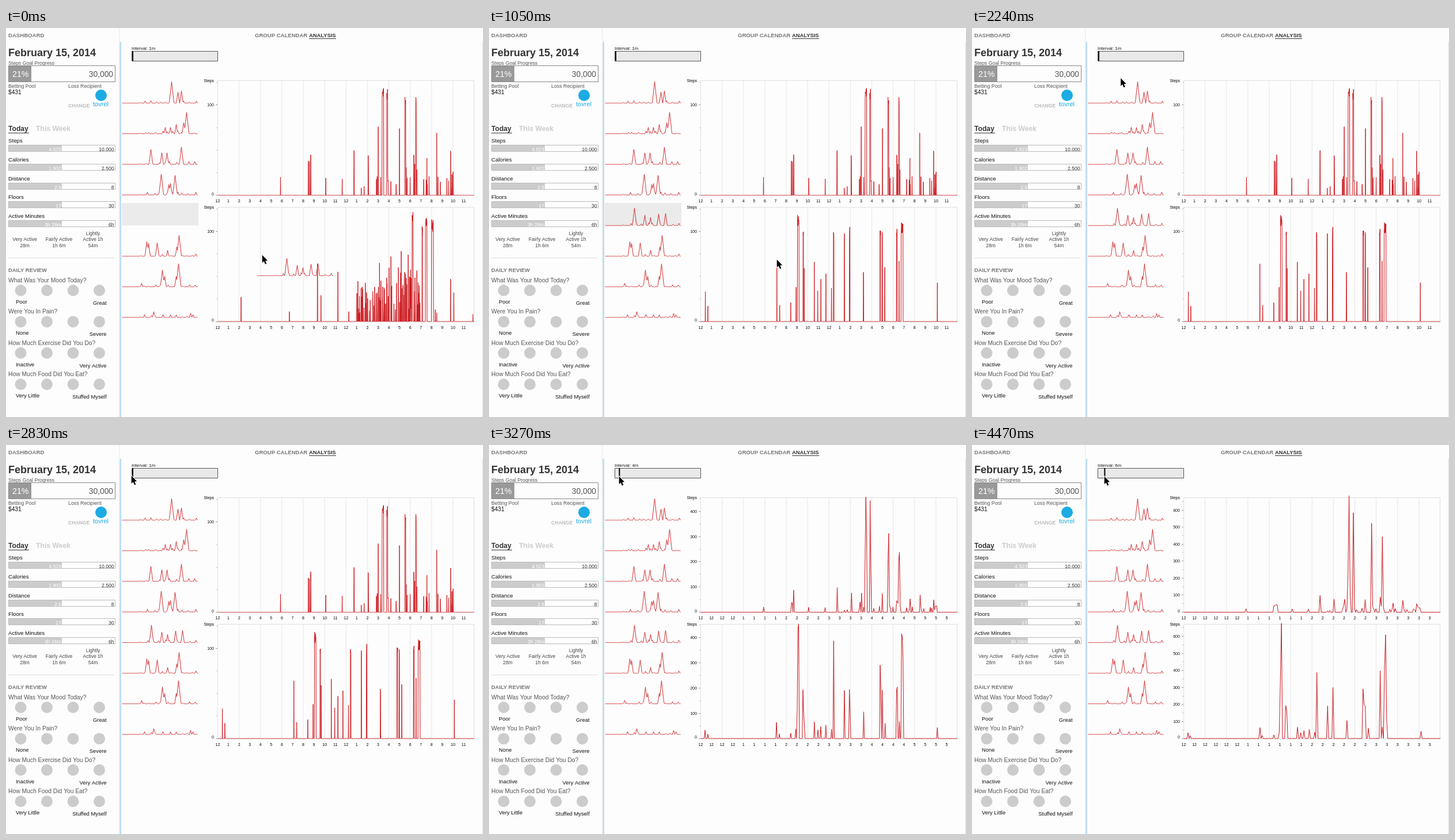
These frames come from a looping animation (828x676 px, 4.92 s). An HTML page with a canvas:

```html
<!DOCTYPE html>
<html lang="en">
<head>
<meta charset="utf-8">
<title>Activity dashboard</title>
<style>
  html, body { margin: 0; width: 100%; height: 100%; overflow: hidden; background: #fdfdfd; }
  canvas { display: block; }
</style>
</head>
<body>
<canvas id="stage" width="828" height="676"></canvas>
<script>
const ctx = document.getElementById('stage').getContext('2d');
const LOOP = 4920, DROP = 1050;
const RED = '#cc1a20', GREY = '#ccc';
const LEFT = 367.5, RIGHT = 813, HOUR = (RIGHT - LEFT) / 24, HEIGHT = 199.5;

function seeded(seed) {
  return () => (seed = (seed * 16807) % 2147483647) / 2147483647;
}

// Steps for every minute of a day, from walks of [start, pace, minutes = 1]
function makeDay(walks, seed) {
  const rand = seeded(seed), day = new Array(1440).fill(0);
  for (const [start, pace, length = 1] of walks) {
    for (let i = 0; i < length; i++) day[start + i] = pace * (length > 1 ? 1 - 0.13 * rand() : 1);
  }
  return day;
}

// Scatters short moves of a minute each over part of a day
function fidget(day, from, to, chance, pace, seed) {
  const rand = seeded(seed);
  for (let m = from; m < to; m++) {
    const hit = rand() < chance, steps = pace * (0.2 + 0.8 * rand());
    if (hit) day[m] = Math.max(day[m], steps);
  }
}

const firstDay = makeDay([
  [352, 20], [508, 38], [514, 37], [521, 45, 2], [606, 19], [698, 18], [764, 50, 2], [844, 44],
  [900, 76], [922, 121, 9], [948, 119, 5], [1019, 74], [1050, 112, 5], [1099, 46, 2],
  [1110, 109, 4], [1173, 41], [1228, 69], [1306, 49], [1319, 26, 2]
], 11);
fidget(firstDay, 805, 1340, 0.06, 36, 23);

const secondDay = makeDay([
  [26, 33], [40, 17], [427, 64], [443, 18], [505, 21], [535, 38], [543, 118, 9], [574, 108, 3],
  [580, 59], [637, 66], [656, 34], [674, 47], [702, 53], [733, 37], [744, 101, 4], [805, 98, 2],
  [834, 106, 3], [912, 58, 2], [1005, 104, 5], [1018, 100, 2], [1032, 60], [1098, 106, 4],
  [1112, 67], [1124, 112, 11], [1327, 43]
], 5);

const busyDay = makeDay([
  [131, 27], [402, 11], [559, 64, 2], [579, 29], [674, 55], [735, 11], [907, 65], [971, 72],
  [1029, 78], [1068, 74], [1090, 122, 6], [1146, 106, 3], [1165, 115, 9], [1199, 114, 11],
  [1306, 47], [1324, 32], [1431, 8]
], 3);
for (let m = 780; m < 1140; m += 24) fidget(busyDay, m, m + 19, 0.3, m < 945 ? 46 : 64, m);
fidget(busyDay, 1220, 1265, 0.1, 38, 9);

// Main peaks of each small chart as x, height pairs
const sparks = [
  [86, 37, 97, 19, 103, 21],
  [75, 11, 84, 11, 94, 16, 107, 19, 112, 37],
  [50, 26, 69, 20, 78, 20, 103, 30],
  [68, 36, 81, 18, 84, 20, 92, 34],
  [51, 30, 69, 18, 79, 14, 93, 20, 105, 21],
  [43, 25, 46, 22, 61, 23, 79, 10, 95, 16, 99, 36],
  [34, 6, 70, 29, 74, 18, 94, 18, 98, 40],
  [55, 10, 119, 7]
].map((peaks, row) => {
  const rand = seeded(row + 71), line = new Array(132).fill(0);
  const peak = (px, h) => line.forEach((v, x) => {
    line[x] = Math.max(v, h * (1 - Math.abs(x - px) / (1.5 + h / 14)));
  });
  for (let x = 32; x < 130; x += 5 + Math.round(9 * rand())) peak(x, 1 + 4 * rand());
  for (let i = 0; i < peaks.length; i += 2) peak(peaks[i], peaks[i + 1]);
  return line;
});

function text(str, x, y, size, color = '#111', align = 'left', weight = '') {
  ctx.font = `${weight} ${size}px "Liberation Sans", Arial, sans-serif`;
  ctx.textAlign = align;
  ctx.fillStyle = color;
  ctx.fillText(str, x, y);
}

function box(x, y, w, h, color) {
  ctx.fillStyle = color;
  ctx.fillRect(x, y, w, h);
}

function frame(x, y, w, h, color) {
  ctx.strokeStyle = color;
  ctx.lineWidth = 1;
  ctx.strokeRect(x, y, w, h);
}

function disc(x, y, r, color) {
  ctx.fillStyle = color;
  ctx.beginPath();
  ctx.arc(x, y, r, 0, Math.PI * 2);
  ctx.fill();
}

function polyline(values, x, base, step, scale, weight) {
  ctx.beginPath();
  values.forEach((v, i) => ctx.lineTo(x + i * step, base - v * scale));
  ctx.strokeStyle = RED;
  ctx.lineWidth = weight;
  ctx.lineJoin = 'bevel';
  ctx.stroke();
}

function sidebar() {
  text('DASHBOARD', 4, 15.5, 9.6, '#777', 'left', 'bold');
  text('February 15, 2014', 4, 48.5, 18, '#333', 'left', 'bold');
  text('Steps Goal Progress', 4, 63.5, 8.7, '#555');
  box(4, 66, 40, 27, '#999');
  frame(4.5, 65.5, 185, 28, '#888');
  text('21%', 11, 85, 14.2, '#fff');
  text('30,000', 186, 85, 13.8, '#555', 'right');
  text('Betting Pool', 4, 103.5, 8.8, '#555');
  text('$431', 4, 115, 10.2);
  text('Loss Recipient', 108, 103.5, 8.8, '#555');
  text('CHANGE', 108, 138, 8.6, '#bbb', 'left', 'bold');
  disc(165, 117, 10, '#1cabe2');
  text('tovrel', 164.5, 135.5, 11, '#1cabe2', 'center');

  text('Today', 4, 179, 12.1, '#333', 'left', 'bold');
  box(4, 182, 36, 1, '#333');
  text('This Week', 52, 179, 12.2, GREY, 'left', 'bold');
  const goals = [
    ['Steps', '4,523', '10,000'], ['Calories', '1,902', '2,500'], ['Distance', '2.6', '8'],
    ['Floors', '17', '30'], ['Active Minutes', '3h 28m', '6h']
  ];
  goals.forEach(([name, done, goal], i) => {
    const y = Math.round(203 + 32.8 * i);
    text(name, 4, y - 4.5, 9.7);
    box(4, y, 93, 11, GREY);
    frame(4.5, y + 0.5, 185, 11, '#bbb');
    ctx.save();
    ctx.beginPath();
    ctx.rect(4, y, 186, 11);
    ctx.clip();
    text(done, 96, y + 10.8, 8.7, '#fff', 'right');
    text(goal, 187.5, y + 10.8, 8.6, '#333', 'right');
    ctx.restore();
  });
  const active = [[32.5, 'Very Active', '28m'], [92, 'Fairly Active', '1h 6m'], [151, 'Lightly', 'Active 1h', '54m']];
  active.forEach(([x, ...lines]) => lines.reverse().forEach((line, i) =>
    text(line, x, 380.7 - 10.6 * i, 8.5, '#444', 'center')));
  box(4, 399, 184, 1, '#ddd');

  text('DAILY REVIEW', 4, 424, 9.4, '#777', 'left', 'bold');
  const questions = [
    ['What Was Your Mood Today?', 'Poor', 'Great'], ['Were You In Pain?', 'None', 'Severe'],
    ['How Much Exercise Did You Do?', 'Inactive', 'Very Active'],
    ['How Much Food Did You Eat?', 'Very Little', 'Stuffed Myself']
  ];
  questions.forEach(([ask, low, high], i) => {
    const y = 442 + 54.4 * i;
    text(ask, 4, y, 10.3, '#555');
    for (let k = 0; k < 4; k++) disc(25.5 + 45.5 * k, y + 14, 10, GREY);
    text(low, 17, y + 36.8, 9.4);
    text(high, 174.5, y + 38.8, 9.4, '#111', 'right');
  });
}

function header() {
  box(196, 0, 1, 676, '#ebebeb');
  box(197.5, 24, 2.5, 652, '#b9dcf0');
  box(827, 24, 1, 652, '#ddd');
  text('GROUP CALENDAR', 432, 15.5, 9.55, '#777', 'left', 'bold');
  text('ANALYSIS', 526, 15.5, 9.4, '#333', 'left', 'bold');
  box(526, 18, 47, 1, '#333');
}

function slider(minutes, x) {
  text(`Interval: ${minutes}m`, 218, 37.5, 7.9);
  box(218, 40, 150, 18, '#e9e9e9');
  frame(218.5, 40.5, 149, 17, '#555');
  box(x - 1, 40, 2, 17, '#000');
}

function axes(base, minutes, scale) {
  const top = Math.round(base - HEIGHT), minor = minutes > 1 ? 50 : 25;
  for (let i = 2; i < 24; i += 2) box(LEFT + HOUR * i - 0.5, top, 1, HEIGHT, '#e7e7e7');
  frame(LEFT, top + 0.5, RIGHT - LEFT - 0.5, HEIGHT, '#e0e0e0');
  for (let v = 0; v * scale < HEIGHT; v += minor) {
    const y = base - v * scale, major = v % 100 === 0;
    box(major ? 364 : 365, Math.round(y - 0.5), major ? 3 : 2, 1, major ? '#999' : '#bbb');
    if (major) text(v, 361, v ? y + 2.5 : y, 7.1, '#111', 'right');
  }
  text('Steps', 361, top + 2.7, 6.9, '#000', 'right');
  for (let i = 0; i < 24; i++) {
    text(Math.floor(i / minutes) % 12 || 12, LEFT + HOUR * i, base + 12.7, 7, '#000', 'center');
  }
}

// Sums the day into bins of the chosen interval
function plot(base, day, minutes) {
  const bins = new Array(1440 / minutes).fill(0);
  day.forEach((steps, m) => bins[Math.floor(m / minutes)] += steps);
  const scale = HEIGHT / (18 + 109.4 * minutes);
  axes(base, minutes, scale);
  polyline(bins, LEFT, base, (RIGHT - LEFT) / (bins.length - 1), scale, 1);
}

function thumbnails(hover, drag) {
  sparks.forEach((line, i) => {
    const base = 130.5 + 53.2 * i, moved = i === 4 && drag;
    if (i === hover) box(201, Math.round(base - 39), 133, 39, '#ebebeb');
    polyline(line, moved ? 436.5 + drag.x : 201.5, moved ? 430.5 + drag.y : base, 1, 1, 0.9);
  });
}

function pointer(x, y) {
  const outline = [[0, 0], [0, 13.6], [3, 10.8], [5.3, 16], [7.7, 15], [5.4, 9.9], [9.5, 9.7]];
  ctx.beginPath();
  outline.forEach(([dx, dy]) => ctx.lineTo(x + dx - 0.3, y + 0.5 + dy));
  ctx.closePath();
  ctx.lineJoin = 'round';
  ctx.lineWidth = 2;
  ctx.strokeStyle = '#fff';
  ctx.stroke();
  ctx.fillStyle = '#000';
  ctx.fill();
}

// Slider moves: time, pointer x, interval
const slides = [[3130, 224, 3], [3270, 226, 4], [3420, 228, 4], [3570, 229, 5], [4470, 230, 6]];

// The pointer advances in held steps of about 150 ms
function pointerAt(t) {
  if (t < DROP) {
    const p = Math.min(1, Math.floor(t / 150) / 4);
    return { x: 445 + 65 * (1 - (1 - p) ** 1.6), y: 394 + 10 * p };
  }
  if (t < 1490) return { x: 500, y: 402 };
  if (t < 1640) return { x: 448, y: 380 };
  const left = 1 - Math.min(1, Math.floor((t - 1640) / 148.75) / 8);
  return { x: 218 + 162 * left ** 2, y: 53 + 270 * left ** 3 };
}

function hoverAt(t) {
  return t < 1938 ? 4 : t < 2086 ? 1 : t < 2235 ? 0 : -1;
}

function draw(t) {
  const slide = slides.filter(s => s[0] <= t).pop();
  const { x, y } = slide ? { x: slide[1], y: 54 } : pointerAt(t);
  const minutes = slide ? slide[2] : 1, dropped = t >= DROP;
  box(0, 0, 828, 676, '#fdfdfd');
  header();
  sidebar();
  slider(minutes, slide ? x + 0.4 : 220);
  plot(290.5, firstDay, minutes);
  plot(510, dropped ? secondDay : busyDay, minutes);
  thumbnails(hoverAt(t), !dropped && { x: x - 445, y: y - 394 });
  pointer(x, y);
}

function tick() {
  draw(performance.now() % LOOP);
  requestAnimationFrame(tick);
}
tick();
</script>
</body>
</html>
```
